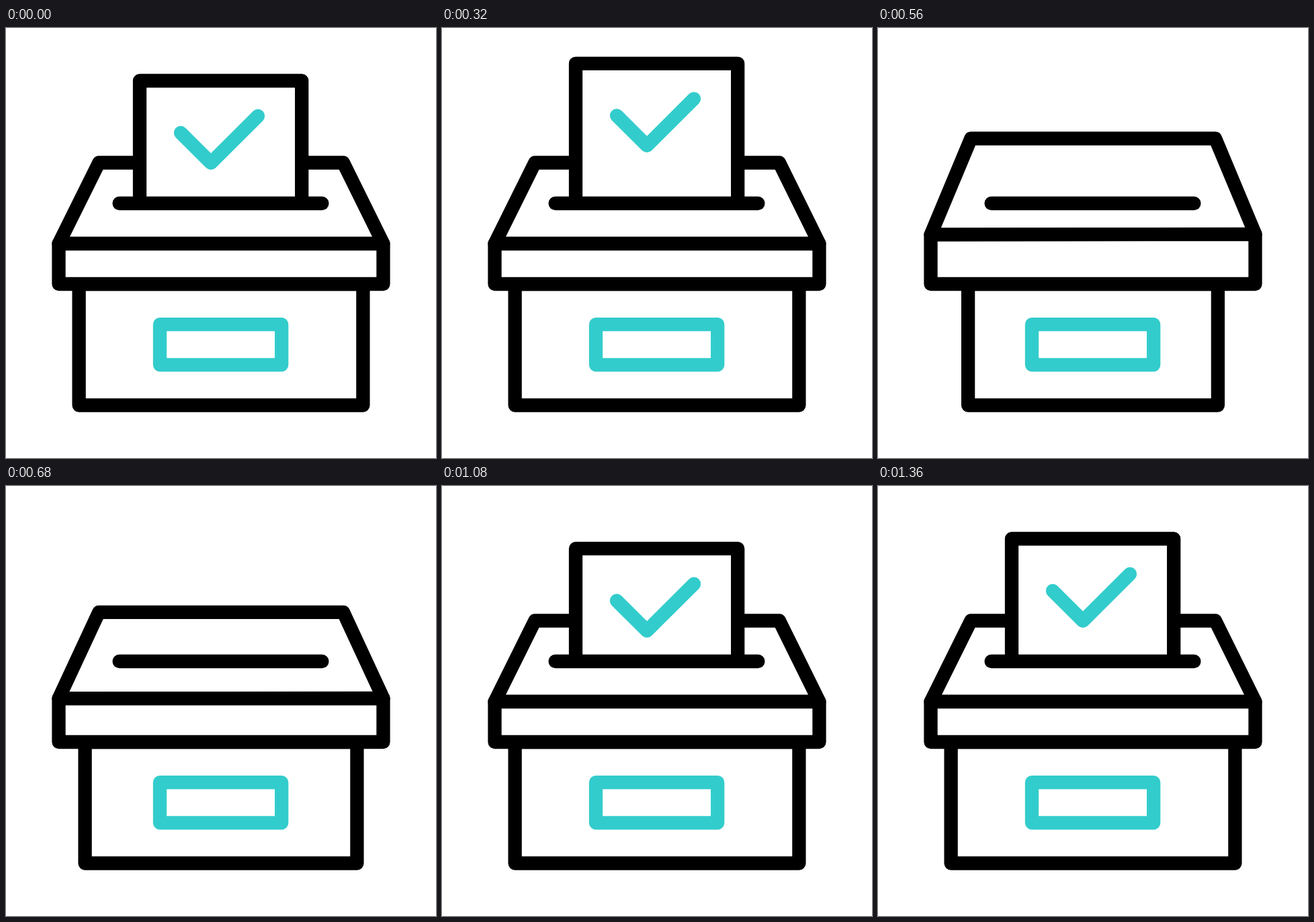
These frames come from a looping animation (640x640 px, 1480 ms). An HTML page with a canvas:

```html
<!DOCTYPE html>
<html lang="en">
<head>
<meta charset="utf-8">
<title>Ballot box</title>
<style>
html, body { margin: 0; width: 100%; height: 100%; overflow: hidden; background: #fff; }
canvas { display: block; width: 100vw; height: 100vh; }
</style>
</head>
<body>
<canvas id="stage" width="640" height="640"></canvas>
<script>
const ctx = document.getElementById('stage').getContext('2d');
const LOOP = 1480, STEP = 40;
const BLACK = '#000', TEAL = '#33cccc';
const LIFT = -40, SUNK = 236;

const smooth = p => p * p * (3 - 2 * p);
const slowStart = p => smooth(p) ** 2;

// Keys are [time, value, easing towards this key].
function track(keys, t) {
  let [t0, v0] = keys[0];
  if (t <= t0) return v0;
  for (const [t1, v1, ease = smooth] of keys.slice(1)) {
    if (t < t1) return v0 + (v1 - v0) * ease((t - t0) / (t1 - t0));
    t0 = t1;
    v0 = v1;
  }
  return v0;
}

const paperKeys = [
  [120, 0], [400, LIFT, slowStart], [600, SUNK],
  [880, SUNK], [1160, LIFT], [1360, 0]
];
const gulpKeys = [[360, 0], [560, 1], [760, 0]];

function shape(points, color, closed, fill) {
  ctx.beginPath();
  points.forEach(([x, y]) => ctx.lineTo(x, y));
  if (closed) ctx.closePath();
  if (fill) {
    ctx.fillStyle = fill;
    ctx.fill();
  }
  ctx.strokeStyle = color;
  ctx.stroke();
}

const box = (l, t, r, b) => [[l, t], [r, t], [r, b], [l, b]];

function drawBox(gulp) {
  const inset = 25.5 * gulp;
  const back = 200.5 - 36 * gulp;
  const left = 321 - 13.4 * gulp;
  const right = 321 - 14.2 * gulp;
  shape(box(108.6 + inset, 381, 531.4 - inset, 561.5), BLACK, true);
  shape([[78.5, left], [138.3, back], [502, back], [561.5, right]], BLACK, true);
  shape([[78.5, left], [561.5, right], [561.5, 381], [78.5, 381]], BLACK, true, '#fff');
  shape(box(229, 441.2, 410.2, 501.3), TEAL, true);
}

function drawPaper(dy) {
  ctx.save();
  ctx.beginPath();
  ctx.rect(0, 0, 640, 261);
  ctx.clip();
  ctx.translate(0, dy);
  shape(box(199, 78.5, 440.2, 400), BLACK, true, '#fff');
  shape([[260, 156], [305, 200.8], [375, 131]], TEAL);
  ctx.restore();
}

function draw(t) {
  ctx.fillStyle = '#fff';
  ctx.fillRect(0, 0, 640, 640);
  ctx.lineWidth = 20.3;
  ctx.lineCap = ctx.lineJoin = 'round';
  drawBox(track(gulpKeys, t));
  drawPaper(track(paperKeys, t));
  shape([[168.6, 261], [470.4, 261]], BLACK);
}

const start = performance.now();
function tick() {
  const t = (performance.now() - start) % LOOP;
  draw(Math.floor(t / STEP) * STEP);
  requestAnimationFrame(tick);
}
tick();
</script>
</body>
</html>
```
